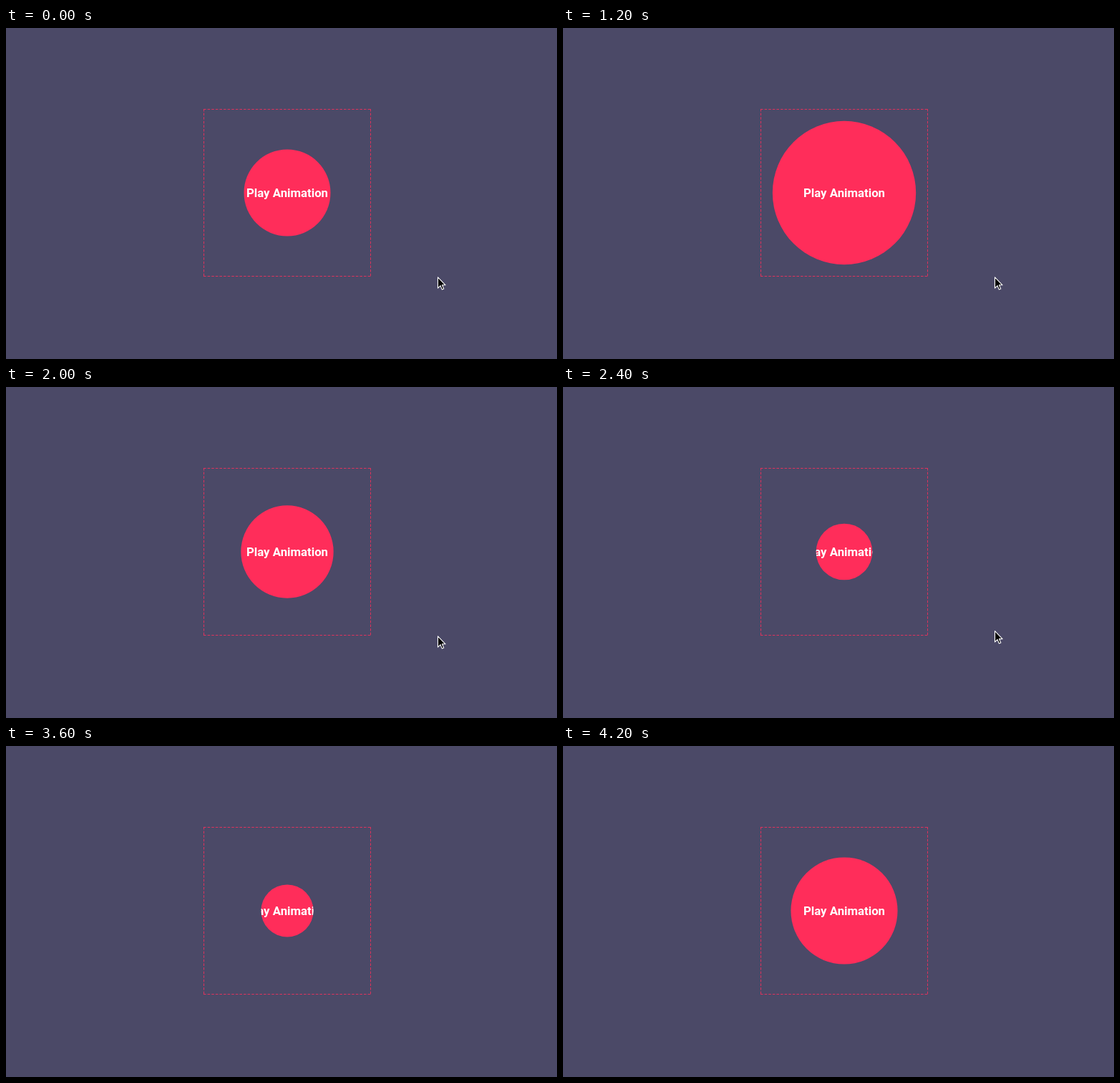
These frames come from a looping animation (770x462 px, 4300 ms). An HTML page:

```html
<!DOCTYPE html>
<html lang="en">
<head>
<meta charset="utf-8">
<title>Play Animation</title>
<style>
  html, body { margin: 0; width: 100%; height: 100%; overflow: hidden; background: #4b4967; }
  svg { display: block; width: 770px; height: 462px; }
  text { font: 700 16.8px Roboto, "Open Sans", sans-serif; fill: #fff; text-anchor: middle; }
</style>
</head>
<body>
<svg viewBox="0 0 770 462">
  <defs>
    <clipPath id="reveal"><circle id="hole" cx="393" cy="230" r="60.5"/></clipPath>
  </defs>
  <path d="M276 113.5H510M276 346.5H510M276.5 113V347M509.5 113V347"
        fill="none" stroke="#ff2d5a" stroke-opacity=".8" stroke-dasharray="3.6 2"/>
  <g clip-path="url(#reveal)">
    <circle cx="393" cy="230" r="100.2" fill="#ff2d5a"/>
    <text x="393" y="235.7">Play Animation</text>
  </g>
  <path id="cursor" d="M0 .3V15.6L3.6 12.2L5.9 17.6L8.3 16.6L6 11.3H10.6Z"
        fill="#000" stroke="#fff" stroke-width="1.1" stroke-linejoin="round"/>
</svg>
<script>
  const LOOP = 4300, STEP = 100;
  const CLOSED = 3022;   // when the circle has shrunk to nothing
  const LEAVE = 2200;    // when the pointer starts to move away
  const hole = document.getElementById('hole');
  const cursor = document.getElementById('cursor');

  // Grows steadily, then shrinks to nothing and opens again
  const radius = t => Math.min(60.5 + 0.0585 * t, 0.0633 * Math.abs(CLOSED - t));

  // Accelerates upwards until it is off the stage
  function pointer(t) {
    const u = Math.max(0, t - LEAVE) / 700;
    return [603.5 + 18 * u ** 5, 347.5 - 308 * u ** 3];
  }

  const start = performance.now();
  function draw() {
    const t = Math.floor((performance.now() - start) % LOOP / STEP) * STEP;
    hole.setAttribute('r', radius(t));
    cursor.setAttribute('transform', `translate(${pointer(t)})`);
    requestAnimationFrame(draw);
  }
  draw();
</script>
</body>
</html>
```
